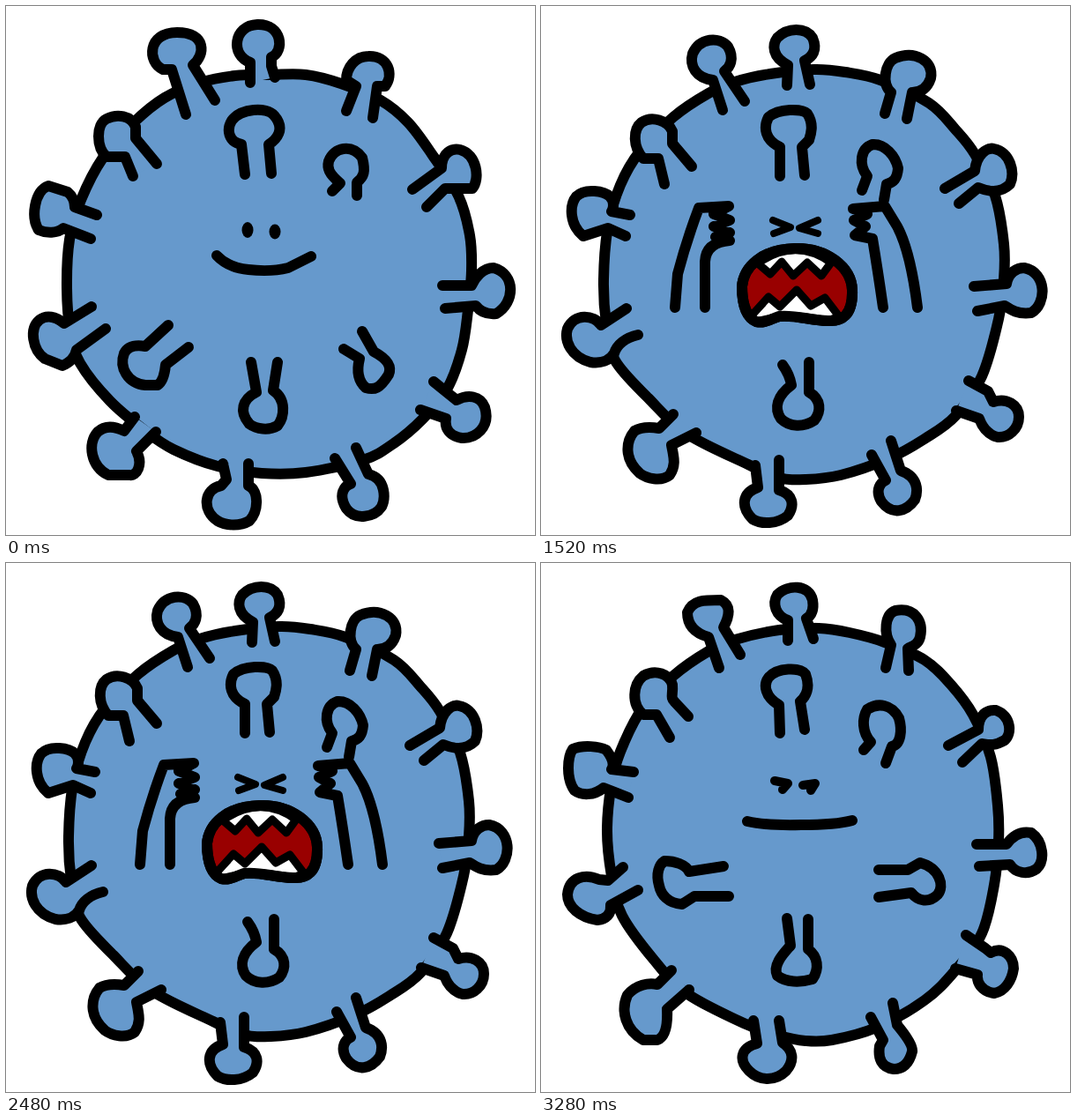
An HTML page that plays this animation: 600 by 600 pixels, repeating every 3.36 s.

```html
<!DOCTYPE html>
<html lang="en">
<head>
<meta charset="utf-8">
<title>Crying germ</title>
<style>
  html, body { margin: 0; width: 100%; height: 100%; overflow: hidden; background: #fff; }
  svg { display: block; width: 100%; height: 100%; fill: #69c; stroke: #000; stroke-width: 12; stroke-linecap: round; stroke-linejoin: round; }
  [data-part] { display: none; }
  .on { display: inline; }
  .line { fill: none; }
  .eyes { fill: none; stroke-width: 8; }
  .pupils { fill: #000; stroke: none; }
  .throat { fill: #900; }
  .teeth { fill: #fff; stroke-width: 9; }
</style>
</head>
<body>
<svg viewBox="0 0 600 600">
  <path data-part="bodyIdle" data-loop="300,78 340,78 380,88 425,107 456,132 483,168 513,215 526,260 528,300 524,345 517,390 500,435 472,469 440,496 405,515 340,529 290,530 240,522 190,503 158,482 118,448 84,405 73,370 69,320 72,265 85,220 110,172 145,132 180,104 220,87 260,79"/>
  <path data-part="bodyA" data-loop="300,75 340,76 385,90 430,110 463,140 487,172 510,220 522,270 525,320 519,370 500,430 470,468 405,518 345,540 315,542 275,531 235,514 170,484 128,445 88,395 76,360 73,310 76,255 87,215 110,172 145,132 180,104 220,87 260,79"/>
  <path data-part="bodyB" data-loop="310,72 345,75 385,84 440,110 470,140 492,168 515,215 525,270 525,310 519,355 500,420 470,465 435,491 395,513 340,532 300,537 270,535 235,520 165,485 122,445 84,402 74,360 71,310 76,250 90,203 112,165 150,126 190,99 220,86 260,77"/>
  <path data-part="bodyC" data-loop="315,74 350,79 390,90 435,110 465,138 490,172 510,220 518,275 519,315 514,365 500,420 470,462 435,496 380,527 330,541 300,542 270,536 230,522 165,488 128,450 92,400 80,355 75,300 82,240 95,202 115,165 150,128 190,100 220,87 270,76"/>

  <g data-part="knobsA">
    <path d="M204 123 188 72 178 72C160 64 160 30 194 30C228 30 226 56 212 67L237 107"/>
    <path d="M277 87V64C254 56 258 22 285 21C314 20 316 52 301 58V68L305 81"/>
    <path d="M386 119 397 91 386 84C386 70 396 57 411 57C434 56 440 78 430 91H421L416 127"/>
    <path d="M461 208 494 184C494 166 506 161 515 163C534 168 538 196 529 207H498L477 228"/>
    <path d="M495 317H528C532 308 541 297 553 297C578 304 578 336 556 349C545 350 538 347 533 340L498 343"/>
    <path d="M485 426 511 447C524 440 538 442 543 455C550 478 532 491 517 490C504 488 497 480 499 468L470 458"/>
    <path d="M397 501 411 531C432 536 430 560 426 568C418 580 396 584 386 570C376 554 384 544 391 542L373 513"/>
    <path d="M275 519V544C288 550 286 574 276 584C266 590 250 590 240 584C222 572 224 548 244 544L250 537 246 519"/>
    <path d="M170 483 148 505C156 520 148 534 140 532H116C96 522 92 496 104 483C114 474 126 478 134 482L146 466"/>
    <path d="M113 366 80 390C78 400 72 404 64 408L44 400C30 390 26 366 38 356C46 350 56 352 66 360L97 341"/>
    <path d="M96 264 65 252C58 258 46 258 37 254C28 240 32 210 48 204L70 211C76 216 78 222 78 228L103 237"/>
    <path d="M144 193 135 171H114C102 160 102 134 114 128C126 122 142 124 147 137V150L171 179"/>
    <path d="M271 191 267 157C252 154 250 140 256 130C266 116 296 114 304 124C318 140 306 152 298 157L301 190"/>
    <path d="M370 210 379 201C366 190 364 184 366 176C372 160 392 156 404 172C408 188 406 194 398 200V215"/>
    <path d="M308 404 303 436C318 446 316 466 308 476C298 482 284 480 276 474C264 460 268 446 284 438L278 404"/>
  </g>
  <g data-part="knobsB">
    <path d="M206 118 195 84C176 82 168 68 172 54C180 36 202 34 212 46C220 60 214 70 208 74L231 108"/>
    <path d="M279 90 280 67C262 58 262 44 268 36C280 24 300 24 308 36C314 50 308 58 299 62L305 89"/>
    <path d="M390 122 397 98C386 88 390 64 402 59C424 50 446 62 442 82C438 94 430 98 421 98L415 128"/>
    <path d="M458 207 492 187C494 168 506 160 514 162C532 166 538 188 532 202C520 214 506 210 496 206L474 224"/>
    <path d="M491 318 528 315C530 302 540 297 548 297C574 302 574 338 556 348C540 350 532 344 526 340L495 346"/>
    <path d="M485 425 507 437 513 449C528 444 542 452 542 466C542 480 530 490 518 489C506 486 500 476 497 468L471 459"/>
    <path d="M397 493 408 527C428 534 428 550 424 560C414 574 398 578 386 562C378 548 386 540 391 538L375 509"/>
    <path d="M270 515V549C286 554 288 566 280 578C268 588 250 588 240 582C226 568 228 552 246 546L243 521"/>
    <path d="M176 484 148 498C150 510 154 520 146 532C136 540 120 536 112 530C94 514 96 494 106 482C116 476 128 478 134 479L150 463"/>
    <path d="M110 373C96 376 86 384 83 394C78 402 68 406 56 404C34 398 26 380 30 366C38 348 60 350 68 362L97 343"/>
    <path d="M96 261 76 252 48 261C32 248 32 226 40 216C50 206 72 210 78 216C84 222 82 230 80 233L101 237"/>
    <path d="M140 202 133 173H116C104 160 104 140 114 132C126 124 144 130 149 142V156L171 182"/>
    <path d="M271 193V160C254 152 252 138 258 126C270 116 296 116 302 122C310 134 306 146 304 152L296 160 299 192"/>
    <path d="M364 209 370 193C360 180 362 162 376 157C390 156 402 170 405 184C404 196 400 200 392 202L389 220"/>
    <path d="M304 404V438C318 446 318 460 310 470C298 478 282 478 272 468C264 456 268 442 284 430Q282 418 274 407"/>
  </g>
  <g data-part="knobsC">
    <path d="M202 119 190 84C176 80 166 72 166 56C172 42 184 42 204 42C216 48 214 60 207 73L226 104"/>
    <path d="M280 88V65C266 60 262 46 268 36C280 24 304 24 308 42C310 54 306 60 301 63L309 86"/>
    <path d="M391 119 397 93C388 80 390 58 402 54C424 50 434 66 430 84C428 92 422 94 416 97L417 122"/>
    <path d="M462 207 496 189C496 172 506 166 516 167C534 174 534 194 526 201C514 208 508 206 500 205L478 226"/>
    <path d="M494 319H528C536 308 546 304 556 306C570 316 572 338 562 347C552 354 538 352 532 342L497 344"/>
    <path d="M482 422 504 437 510 442C524 434 536 446 536 460C534 474 526 486 514 488C500 486 494 476 495 467L470 460"/>
    <path d="M399 499 404 524C414 536 422 548 421 554C418 566 412 574 400 574C386 572 382 562 384 548L388 541 374 515"/>
    <path d="M270 519 274 544C286 552 288 564 278 576C266 588 248 588 236 576C224 564 226 550 245 545L241 519"/>
    <path d="M168 484 143 506C144 528 140 538 132 541H116C96 530 90 508 98 490C108 478 122 476 132 478L148 462"/>
    <path d="M110 371 79 388C80 398 74 404 64 405C44 402 30 390 30 376C32 356 50 352 66 359L76 360 93 345"/>
    <path d="M99 266 71 255C60 264 46 264 38 258C28 244 30 220 36 211C48 206 66 208 74 212C80 220 84 228 80 234L105 237"/>
    <path d="M146 198 131 172H116C102 160 104 138 116 128C130 120 146 126 149 138C150 150 146 152 152 158L167 174"/>
    <path d="M271 193 270 161C254 152 252 138 258 130C268 118 294 118 300 126C306 142 300 152 294 157L299 189"/>
    <path d="M366 212 374 203C364 192 364 176 370 166C382 158 398 160 406 176C410 190 408 206 398 208L391 227"/>
    <path d="M303 404V438C314 446 316 460 308 472C294 476 278 476 268 468C262 456 276 442 283 434L279 403"/>
  </g>

  <g data-part="armsIdle">
    <path d="M404 369 417 392C432 400 438 408 434 418C424 434 418 436 408 433C398 424 398 412 401 400L383 389"/>
    <path d="M207 387 181 407C180 418 178 426 172 430H158C138 428 128 410 134 394C138 386 146 384 158 386L184 362"/>
  </g>
  <g data-part="armsFlat">
    <path d="M383 348H416L430 340C452 346 458 366 450 376C440 386 428 384 420 374L383 379"/>
    <path d="M213 378H174L160 387C144 386 136 376 134 366C130 352 134 342 140 338C152 338 164 342 168 350L207 344"/>
  </g>
  <g data-part="armsLow">
    <path id="low" d="M150 344 154 318C140 300 152 284 170 284C190 286 194 304 186 318L187 344"/>
    <use href="#low" transform="matrix(-1 0 0 1 579 0)"/>
  </g>
  <g data-part="armsMid">
    <path id="mid" d="M150 342Q152 300 164 280C152 262 166 246 182 248C204 252 202 274 190 286L187 342"/>
    <use href="#mid" transform="matrix(-1 0 0 1 579 0)"/>
  </g>
  <g data-part="armsB" class="line">
    <path d="M152 342 155 304Q165 266 179 229L213 227 196 236 214 243 196 250 214 257 198 262 214 266Q187 268 186 290V342"/>
    <path d="M427 342Q419 278 404 250L390 227 354 230 370 236 355 243 368 250 356 260 376 264Q382 300 388 342"/>
  </g>
  <g data-part="armsA" class="line">
    <path d="M151 342Q152 308 172 276 194 244 209 240L232 250 214 256 230 263 207 271 224 276 210 282 222 285 199 288Q193 310 191 342"/>
    <path d="M430 342Q432 316 414 288 394 254 371 240L347 250 364 255 350 262 368 268 356 276 374 280 364 286 382 288Q388 310 389 342"/>
  </g>

  <g data-part="eyesOpen" class="pupils">
    <ellipse cx="274" cy="254" rx="6.5" ry="9"/><ellipse cx="305" cy="256" rx="6.5" ry="8.5"/>
  </g>
  <g data-part="eyesHalf" class="pupils">
    <ellipse cx="273" cy="259" rx="9" ry="6"/><ellipse cx="306" cy="260" rx="9" ry="6"/>
  </g>
  <path data-part="eyesShut" class="eyes" d="M264 262Q274 268 284 262M296 263Q306 269 317 263"/>
  <path data-part="eyesDroop" class="eyes" d="M265 247 280 250 274 257M297 252 311 250 306 258" style="stroke-width:10"/>
  <path data-part="eyesTight" class="eyes" d="M268 248Q281 249 280 255L268 263M313 250 300 256 312 264" style="stroke-width:10"/>
  <path data-part="eyesB" class="eyes" d="M263 243 283 251 264 258M314 243 293 252 314 258"/>
  <path data-part="eyesA" class="eyes" d="M261 241 280 248 262 256M309 239 292 250 313 254"/>

  <path data-part="smile" class="line" d="M239 283Q252 297 275 299 300 302 320 297L346 284"/>
  <path data-part="flat" class="line" d="M234 293Q255 298 295 297 335 297 353 292"/>
  <g data-part="mouthB" id="cry">
    <path class="throat" id="lips" d="M288 275C324 274 352 296 353 322C354 352 340 358 326 357C306 357 290 350 270 352C258 356 254 360 244 358C230 352 228 330 228 318C230 296 250 276 288 275Z"/>
    <path class="teeth" d="M246 292 260 304 273 290 286 306 302 291 318 306 329 291Q288 262 246 292M238 352 258 330 271 341 290 322 306 340 322 331 338 352 326 357Q290 350 270 352L244 358Z"/>
    <path class="line" d="M288 275C324 274 352 296 353 322C354 352 340 358 326 357C306 357 290 350 270 352C258 356 254 360 244 358C230 352 228 330 228 318C230 296 250 276 288 275Z"/>
  </g>
  <g data-part="mouthA">
    <path class="throat" d="M290 268C330 268 354 294 355 326C356 356 350 366 338 366C312 366 300 358 276 361C262 364 260 370 248 369C230 364 226 344 225 320C226 290 250 268 290 268Z"/>
    <path class="teeth" d="M247 284 260 298 275 283 290 298 304 284 320 298 331 284Q290 258 247 284M240 360 258 343 272 353 290 336 306 352 320 345 338 363Q300 360 276 361L248 368Z"/>
    <path class="line" d="M290 268C330 268 354 294 355 326C356 356 350 366 338 366C312 366 300 358 276 361C262 364 260 370 248 369C230 364 226 344 225 320C226 290 250 268 290 268Z"/>
  </g>
  <ellipse data-part="mouthLow" class="throat" cx="291" cy="300" rx="52" ry="13"/>
  <ellipse data-part="mouthMid" class="throat" cx="291" cy="308" rx="58" ry="27"/>
</svg>
<script>
const LOOP = 3360, STEP = 80, WOBBLE_START = 1200;
const POSES = ['B', 'A', 'C', 'A'];
const parts = [...document.querySelectorAll('[data-part]')];

// Closed Catmull-Rom curve through the given points
function smoothLoop(text) {
  const pts = text.split(' ').map(p => p.split(',').map(Number));
  const at = i => pts[(i + pts.length) % pts.length];
  const lean = (i, sign) => at(i).map((v, k) => v + sign * (at(i + 1)[k] - at(i - 1)[k]) / 6);
  return `M${pts[0]}` + pts.map((_, i) => `C${lean(i, 1)} ${lean(i + 1, -1)} ${at(i + 1)}`).join('') + 'Z';
}

function idleParts(t) {
  const eyes = t < 400 || t >= 640 ? 'eyesOpen' : t < 480 ? 'eyesHalf' : 'eyesShut';
  return ['bodyIdle', 'knobsA', 'armsIdle', 'smile', eyes];
}

function wobbleParts(t) {
  const pose = POSES[Math.floor((t - WOBBLE_START) / STEP) % POSES.length];
  const face = pose === 'A' ? 'A' : 'B';
  const shell = ['body' + pose, 'knobs' + pose];
  if (t >= 3280) return [...shell, 'armsFlat', 'eyesDroop', 'flat'];
  if (t < 1280 || t >= 3200) return [...shell, 'armsFlat', 'eyesTight', 'flat'];
  const stage = t < 1360 || t >= 3120 ? 'Low' : t < 1440 || t >= 3040 ? 'Mid' : face;
  return [...shell, 'arms' + stage, 'eyes' + face, 'mouth' + stage];
}

function draw(now) {
  const t = now % LOOP;
  const shown = t < WOBBLE_START ? idleParts(t) : wobbleParts(t);
  for (const part of parts) part.classList.toggle('on', shown.includes(part.dataset.part));
}

for (const body of document.querySelectorAll('[data-loop]')) body.setAttribute('d', smoothLoop(body.dataset.loop));

const start = performance.now();
function tick() {
  draw(performance.now() - start);
  requestAnimationFrame(tick);
}
tick();
</script>
</body>
</html>
```
